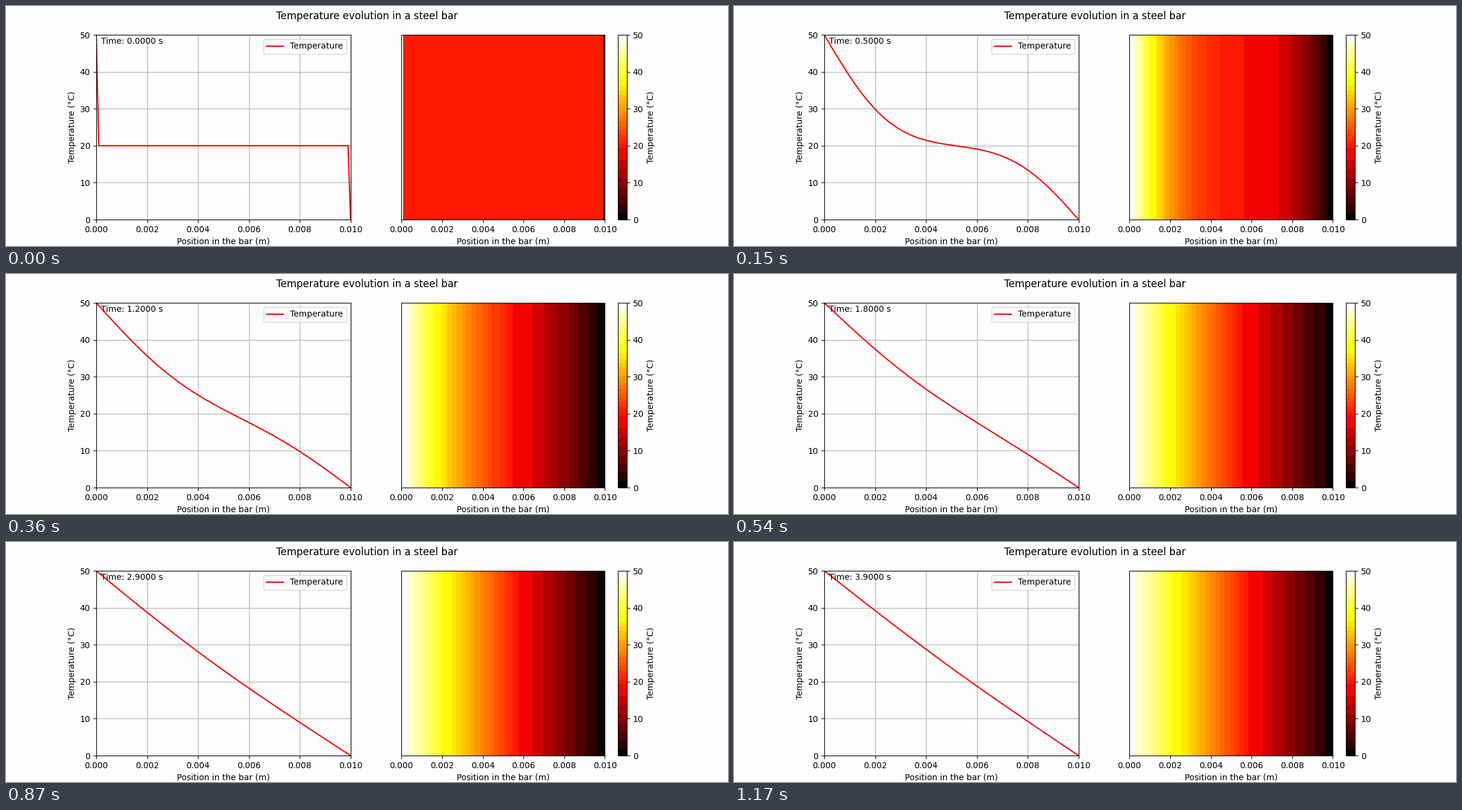
Recreate the animation shown at these times as a matplotlib script. Size 1200 px wide and 400 px high, loop 1.2 s.

```python
import numpy as np
import matplotlib.pyplot as plt
from matplotlib.animation import FuncAnimation
from matplotlib.colors import ListedColormap

LENGTH, NODES = 0.01, 101
ALPHA = 4.2e-6          # thermal diffusivity of steel, m^2/s
DT, SUBSTEPS = 1e-3, 100
FRAMES, INTERVAL = 40, 30
WHITE, RED = "#fefefe", "#f90000"


def solve():
    """Explicit finite differences; one temperature profile per frame."""
    r = ALPHA * DT / (LENGTH / (NODES - 1)) ** 2
    temp = np.full(NODES, 20.0)
    temp[0], temp[-1] = 50, 0
    profiles = [temp.copy()]
    for _ in range(FRAMES - 1):
        for _ in range(SUBSTEPS):
            temp[1:-1] += r * (temp[2:] - 2 * temp[1:-1] + temp[:-2])
        profiles.append(temp.copy())
    return profiles


def banded_hot():
    """The 'hot' map in flat bands: 8 red, 16 green and 8 blue levels."""
    lut = (plt.get_cmap("hot")(np.arange(256))[:, :3] * 255).astype(int)
    cells = lut // (32, 16, 32)
    bands = lut.astype(float)
    for cell in np.unique(cells, axis=0):
        band = (cells == cell).all(axis=1)
        bands[band] = lut[band].mean(axis=0)
    bands[cells[:, 0] == 0] = 8, 0, 0
    bands[cells[:, 2] == 7] = 254
    return ListedColormap(bands / 255)


profiles = solve()
x = np.linspace(0, LENGTH, NODES)

plt.rcParams.update({"font.family": "DejaVu Sans", "font.size": 10,
                     "figure.facecolor": WHITE, "axes.facecolor": WHITE})
fig, (ax, bar) = plt.subplots(1, 2, figsize=(12, 4), dpi=100)
fig.suptitle("Temperature evolution in a steel bar")

line, = ax.plot(x, profiles[0], color=RED, label="Temperature")
ax.set(xlim=(0, LENGTH), ylim=(0, 50),
       xlabel="Position in the bar (m)", ylabel="Temperature (°C)")
ax.grid(True)
ax.legend(loc="upper right")
clock = ax.text(0.02, 0.95, "", transform=ax.transAxes)

image = bar.imshow(profiles[0][None, :], cmap=banded_hot(), vmin=0, vmax=50,
                   aspect="auto", extent=(0, LENGTH, 0, 1),
                   interpolation="nearest")
bar.set_xlabel("Position in the bar (m)")
bar.set_yticks([])
fig.colorbar(image, ax=bar, label="Temperature (°C)")


def update(i):
    line.set_ydata(profiles[i])
    image.set_data(profiles[i][None, :])
    clock.set_text(f"Time: {i * SUBSTEPS * DT:.4f} s")
    return line, image, clock


anim = FuncAnimation(fig, update, frames=FRAMES, interval=INTERVAL,
                     repeat=True, repeat_delay=0, blit=False)
plt.show()
```
